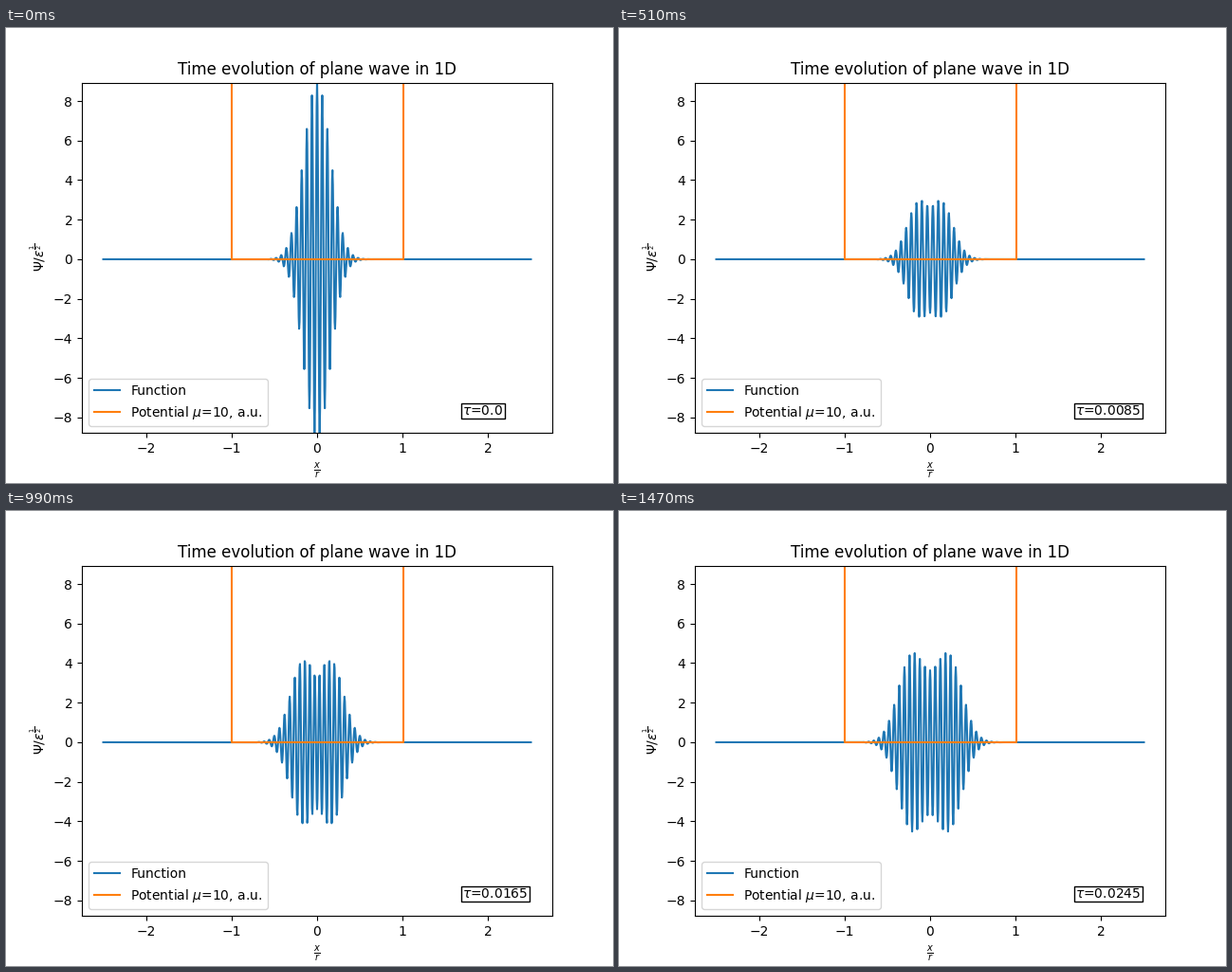
Write a matplotlib script that moves like this. It is 640x480 px and loops after 1500 ms.

```python
import numpy as np
import matplotlib.pyplot as plt
from matplotlib.animation import FuncAnimation

FRAMES = 50
INTERVAL = 30
DT = 0.0005

AMPLITUDE = 8.94
K = 2 * np.pi / 0.06     # wave number
WIDTH2 = 0.0472          # squared width of the Gaussian envelope
OMEGA = 513.5            # phase frequency
SPEED = 39.9 * np.sqrt(WIDTH2)
SPREAD = 12.2            # broadening rate

x = np.linspace(-2.5, 2.5, 1001)


def envelope(s, t):
    growth = 1 + (SPREAD * t) ** 2
    return growth ** -0.25 * np.exp(-s**2 / (WIDTH2 * growth))


def wave(t):
    """Two packets that start together and drift apart."""
    right = envelope(x - SPEED * t, t) * np.cos(K * x - OMEGA * t)
    left = envelope(x + SPEED * t, t) * np.cos(K * x + OMEGA * t)
    return AMPLITUDE / 2 * (right + left)


fig, ax = plt.subplots(figsize=(6.4, 4.8), dpi=100)
ax.set_title("Time evolution of plane wave in 1D")
ax.set_xlabel(r"$\frac{x}{r}$")
ax.set_ylabel(r"$\Psi/\varepsilon^{\frac{1}{2}}$")
ax.set_xlim(-2.75, 2.75)
ax.set_ylim(-8.78, 8.93)

line, = ax.plot(x, wave(0), label="Function")
ax.plot([-1, -1, 1.005, 1.005], [20, 0, 0, 20],
        label=r"Potential $\mu$=10, a.u.")
ax.legend(loc="lower left")
clock = ax.text(1.7, -8, "", va="bottom",
                bbox=dict(facecolor="white", edgecolor="black", pad=1))


def update(i):
    t = round(i * DT, 4)
    line.set_ydata(wave(t))
    clock.set_text(rf"$\tau$={t}")
    return line, clock


anim = FuncAnimation(fig, update, frames=FRAMES, interval=INTERVAL,
                     repeat=True, repeat_delay=0)
plt.show()
```
